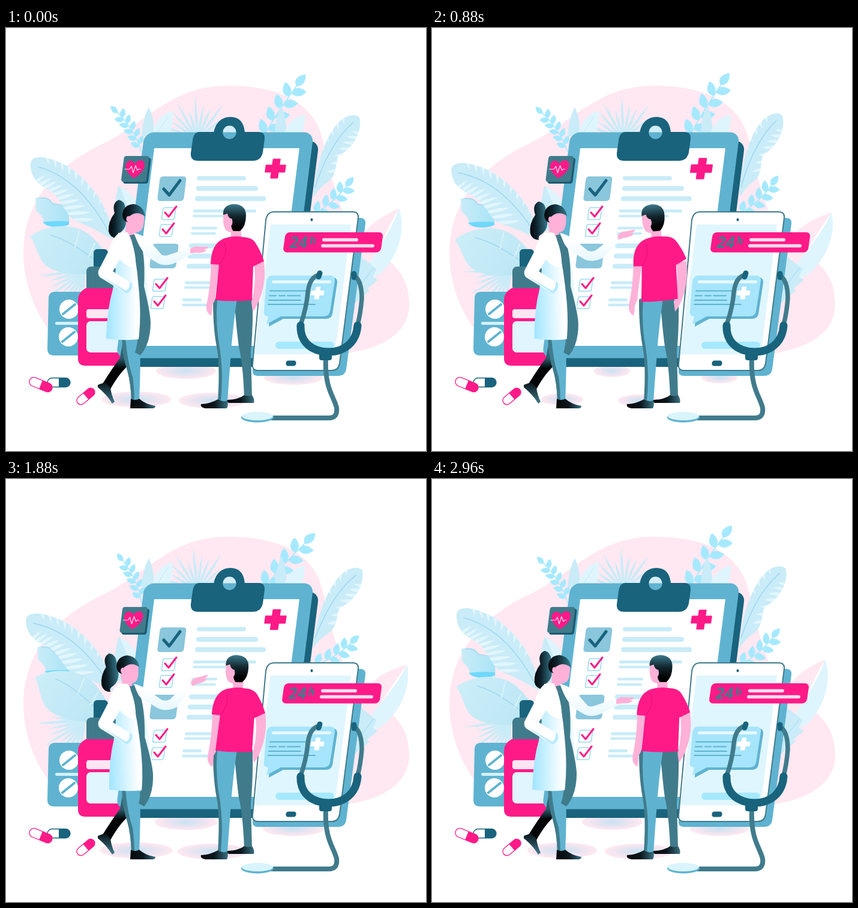
These frames come from a looping animation (700x704 px, 3 s). An HTML page:

```html
<!DOCTYPE html>
<html lang="en">
<head>
<meta charset="utf-8">
<title>Medical consultation</title>
<style>
html, body { margin: 0; width: 100%; height: 100%; overflow: hidden; background: #fff; }
svg { display: block; width: 700px; height: 704px; }
</style>
</head>
<body>
<svg id="stage" viewBox="0 0 700 704"></svg>
<script>
const BLUE = '#5fb3d0', DARK = '#19637d', TEAL = '#407b8c', PINK = '#ff1a88', SKIN = '#ffb1d8';
const PALE = '#c9ecf8', ICE = '#dff5fd', SKY = '#a6e9ff', BLUSH = '#ffe8f1', MINT = '#9fd9ef';

// Drawing helpers, all returning SVG markup
const path = (d, fill, more = '') => `<path d="${d}" fill="${fill}" ${more}/>`;
const line = (d, color, w) => path(d, 'none', `stroke="${color}" stroke-width="${w}" stroke-linecap="round" stroke-linejoin="round"`);
const oval = (x, y, rx, ry, fill) => `<ellipse cx="${x}" cy="${y}" rx="${rx}" ry="${ry}" fill="${fill}"/>`;
const rect = (x, y, w, h, r, fill, more = '') => `<rect x="${x}" y="${y}" width="${w}" height="${h}" rx="${r}" fill="${fill}" ${more}/>`;
const slant = (x, y, w, h, r, fill, k = 7.2, more = '') =>
  `<g transform="translate(${x} ${y}) skewX(${-k})">${rect(0, 0, w, h, r, fill, more)}</g>`;
const bar = (x1, x2, y, h, fill) => rect(x1, y - h / 2, x2 - x1, h, h / 2, fill);
const group = (id, body, more = '') => `<g id="${id}" ${more}>${body}</g>`;
const grad = (id, x2, y2, ...stops) => `<linearGradient id="${id}" x2="${x2}" y2="${y2}">` +
  stops.map(([o, c]) => `<stop offset="${o}" stop-color="${c}"/>`).join('') + '</linearGradient>';
const plus = (x, y, w, h, arm, fill) => `<g transform="translate(${x} ${y}) skewX(-8)">` +
  rect(-arm / 2, -h / 2, arm, h, 1, fill) + rect(-w / 2, -arm / 2, w, arm, 1, fill) + '</g>';

// Point and direction on a quadratic curve given as [x0, y0, cx, cy, x1, y1]
function along(q, t) {
  const u = 1 - t, f = (a, b, c) => u * u * a + 2 * u * t * b + t * t * c;
  const g = (a, b, c) => 2 * u * (b - a) + 2 * t * (c - b);
  return [f(q[0], q[2], q[4]), f(q[1], q[3], q[5]), Math.atan2(g(q[1], q[3], q[5]), g(q[0], q[2], q[4]))];
}

const at = (x, y, a) => `transform="translate(${x} ${y}) rotate(${a * 180 / Math.PI})"`;
const blade = (x, y, a, len, w, fill) => path(`M0 0Q${len * .45} ${-w} ${len} 0Q${len * .45} ${w} 0 0Z`, fill, at(x, y, a));

// Broad leaf with a short stalk and a pointed end
const leaflet = (x, y, a, len) => path(`M0 0C${len * .2} ${-len * .42} ${len * .62} ${-len * .38} ${len} 0` +
  `C${len * .7} ${len * .3} ${len * .3} ${len * .38} 0 0Z`, SKY, at(x, y, a));

function sprig(q, pairs, len) {
  let s = line(`M${q[0]} ${q[1]}Q${q.slice(2).join(' ')}`, SKY, 1.6);
  for (let i = 0; i < pairs; i++) {
    for (const side of [-1, 1]) {
      const [x, y, a] = along(q, .12 + .68 * (i + (side > 0 ? .3 : 0)) / (pairs - 1));
      s += leaflet(x, y, a + side * .85, len);
    }
  }
  return s + leaflet(q[4], q[5], along(q, 1)[2], len);
}

function banana(id, d, q, n, size) {
  let s = '';
  for (let i = 0; i < n; i++) {
    for (const side of [-1, 1]) {
      const t = .08 + .8 * i / n, [x, y, a] = along(q, t);
      s += blade(x + Math.cos(a + side * 1.1) * 10, y + Math.sin(a + side * 1.1) * 10, a + side * 2.15, size, 6, '#e3f6fd');
    }
  }
  return group(id, path(d, PALE) + `<clipPath id="${id}Clip">${path(d, '#000')}</clipPath>` +
    `<g clip-path="url(#${id}Clip)">${s}</g>` + line(`M${q[0]} ${q[1]}Q${q.slice(2).join(' ')}`, MINT, 1.6));
}

function fan(x, y, from, to, n, len) {
  let s = '';
  for (let i = 0; i < n; i++) {
    const a = (from + (to - from) * i / (n - 1)) * Math.PI / 180;
    s += blade(x, y, a, len * (.85 + .15 * Math.cos(i * 2.4)), 4.5, PALE);
  }
  return s;
}

function pill(x, y, a, w, h, c) {
  return `<g transform="translate(${x} ${y}) rotate(${a})">` +
    rect(-w / 2, -h / 2, w, h, h / 2, '#fff', `stroke="${c}" stroke-width="1.3"`) +
    path(`M0 ${-h / 2}H${w / 2 - h / 2}a${h / 2} ${h / 2} 0 0 1 0 ${h}H0Z`, c) + '</g>';
}

const smallCheck = (x, y) => slant(x, y, 21, 20, 3, '#fff', 8, 'stroke="#9cdcf3" stroke-width="1.6"') +
  line(`M${x + 3} ${y + 8}l6 7L${x + 22} ${y - 2}`, PINK, 3);
const tablet = (x, y) => oval(x, y, 16, 16, '#fff') + line(`M${x - 10} ${y + 8}L${x + 10} ${y - 8}`, BLUE, 4);
const shadow = (id, x, y, rx, ry) => group(id, oval(0, 0, rx, ry, 'url(#shade)'), `data-at="${x} ${y}"`);

const defs = '<defs>' +
  '<radialGradient id="shade"><stop offset="0" stop-color="#c8e2f3"/><stop offset=".6" stop-color="#ebe4f0"/><stop offset="1" stop-color="#ffe9f1"/></radialGradient>' +
  grad('coat', 1, 0, [0, '#a0e5ff'], [.9, '#fff']) +
  grad('flap', 1, 0, [0, '#d5f2fd'], [1, '#fff']) +
  grad('cloth', 0, 1, [.3, '#fff'], [1, '#e6f7fe']) +
  grad('hairW', 1, 0, [0, '#05090c'], [.35, '#0d1f28'], [1, '#34788b']) +
  grad('hairM', 0, 1, [0, '#3a7a8b'], [.45, '#13252d'], [.85, '#000']) +
  grad('shoe', 1, 0, [0, '#05080a'], [.5, '#0b161c'], [1, '#3a7080']) +
  grad('heel', 0, 1, [0, '#0a1419'], [1, TEAL]) +
  grad('backLeg', 0, 1, [0, TEAL], [.4, '#2b5d6c'], [.6, '#020405']) +
  grad('ovalFill', 1, .4, [0, '#cdeff9'], [1, '#bce6f4']) +
  grad('bowl', 1, 0, [0, '#c9ecf8'], [1, '#a9e4f6']) + '</defs>';

const backdrop = path('M370 96C440 96 500 115 522 168C538 210 545 300 590 352C610 378 672 385 672 460C672 515 610 541 540 544C300 560 120 560 70 500C40 460 29 410 29 375C29 290 80 235 150 198C232 163 270 96 370 96Z', BLUSH);

const plants =
  group('palmTop', fan(319, 186, -158, -28, 11, 74)) +
  group('sprigL', sprig([226, 206, 214, 168, 186, 141], 5, 16)) +
  group('sprigR', sprig([426, 186, 452, 140, 484, 97], 4, 25)) +
  path('M226 180Q228 150 238 132Q248 152 246 180Z', PALE) + path('M242 180Q252 144 277 138Q281 160 270 180Z', ICE) +
  line('M250 178L270 147', PALE, 1.2) +
  path('M448 180Q448 150 459 129Q468 150 468 180Z', PALE) + path('M462 180Q472 148 498 144Q499 162 491 180Z', ICE) +
  banana('bananaR', 'M512 282C514 235 532 175 560 152C574 142 591 143 590 154C592 177 576 202 555 212C547 225 555 247 531 260Q520 270 512 282Z', [579, 157, 540, 190, 515, 265], 7, 34) +
  group('sprigLow', sprig([508, 312, 546, 292, 567, 264], 4, 20)) +
  group('wing', path('M582 420C578 350 600 325 655 300Q625 350 606 408Z', BLUSH) +
    path('M588 422C610 380 640 345 655 300C667 335 655 378 625 408Q608 418 588 422Z', ICE)) +
  path('M588 378L618 401L611 414L620 419L602 434L606 437L572 466Z', PALE) + line('M578 445L612 400', MINT, 1) +
  group('bowlLeaf', path('M49 283C60 280 72 282 77 292Q90 296 103 297Q106 312 105 327Q96 331 84 331Q68 331 63 326Q64 315 50 304Z', 'url(#bowl)') +
    path('M61 323Q82 320 105 322V327Q96 331 84 331Q68 331 61 323Z', '#6fd8fb') + line('M56 283Q72 281 77 292L100 296', MINT, 1.5)) +
  path('M178 335Q180 295 187 263Q212 272 224 305L215 340Z', PALE) + path('M190 265Q212 272 224 305L213 320Z', ICE) +
  banana('bananaL', 'M178 352C178 300 130 238 85 222C65 213 42 211 41 226C40 246 52 260 70 269C95 282 96 312 118 322C145 332 165 345 178 352Z', [53, 231, 125, 250, 174, 345], 10, 46) +
  group('palmLow', fan(133, 403, 98, 182, 10, 82) + line('M75 412Q110 398 133 403', PALE, 2)) +
  group('ovalLeaf', path('M40 347C70 325 115 324 140 345C158 360 172 382 180 402C150 412 85 417 62 391C51 375 50 360 40 347Z', 'url(#ovalFill)') +
    line('M75 345Q112 355 168 402', MINT, 1.5) + line('M115 365L122 338M138 380L148 358', '#daf3fb', 2));

const shadows = shadow('sh1', 300, 571, 50, 13) + shadow('sh2', 479, 582, 49, 12) +
  shadow('sh3', 217, 618, 58, 13) + shadow('sh4', 344, 620, 56, 13);

const medicine =
  path('M82 439H150V545H80Q69 545 69 534L71 450Q71 439 82 439Z', BLUE) + tablet(105, 468) + tablet(104, 514) + bar(82, 124, 491.5, 5, '#d3f1fb') +
  rect(146, 368, 24, 40, 6, DARK) + rect(134, 397, 50, 42, 8, TEAL) +
  path('M133 433H200V562H132Q120 562 120 550V452Q120 440 133 433Z', PINK) +
  rect(134, 468, 60, 15, 4, '#ffe6f2') + rect(134, 488, 60, 52, 7, '#e0f5fd') +
  pill(88, 590, 0, 38, 15, DARK) + pill(58, 593.5, 22, 40, 15, PINK) + pill(133, 613, -40, 35, 14, PINK);

const texts = [[318, 400, 250, 7], [317, 420, 267, 8], [315, 433, 284, 8], [312, 417, 304.5, 5], [311, 395, 313, 4],
  [309, 352, 333, 4.5], [308, 350, 342, 4], [305, 357, 362.5, 8], [303, 353, 379.5, 8], [301, 353, 396.5, 8],
  [298, 345, 424, 5], [297, 345, 432, 4], [294, 326, 452.5, 5], [293, 340, 461, 4.5]];

const clipboard = slant(241, 188, 281, 376, 16, DARK) + slant(231, 173.5, 282, 376, 16, BLUE) + slant(247, 200, 242, 329, 1, '#fff') +
  path('M346 182C345 163 356 148 374 148C392 148 399 162 398 182Z', DARK) +
  path('M322 173H421Q432 173 431 185L428 207Q425 221 411 221H320Q307 221 308 208L311 187Q313 173 322 173Z', DARK) +
  oval(372.5, 173.5, 11, 11, '#d3edf8') + path('M361.5 173.5H383.5A11 11 0 0 1 361.5 173.5Z', BLUE) +
  texts.map(([a, b, y, h]) => bar(a, b, y, h, '#c8ecf8')).join('') +
  slant(257, 247, 44, 41, 5, '#8ac6dc') + line('M263 268L272 278L290 254', DARK, 5) +
  slant(244, 359, 44, 41, 5, '#8ac6dc') +
  smallCheck(262, 299) + smallCheck(258, 327) + smallCheck(247, 418) + smallCheck(244, 447) +
  group('cross', plus(0, 0, 34, 33, 13, PINK)) +
  group('heart', slant(200, 216, 42, 43, 4, '#1c5a70') + slant(197, 213, 42, 43, 4, TEAL) +
    path('M213 250C203 243 197 234 200 226C203 219 212 219 215 226C219 218 229 218 231 226C232 236 223 244 213 250Z', PINK) +
    line('M198 235H206L209 230L212 241L216 229L219 237L221 235H224', '#ffe3f1', 1.2));

const phone =
  path('M460 316H590Q600 316 599 326L567 568Q565 579 553 579H420Q410 579 411 570Z', BLUE) +
  path('M447 306H578Q588 306 587 316L556 558Q554 570 543 570H420Q410 570 411 560L433 320Q435 306 447 306Z', '#fff', `stroke="${TEAL}" stroke-width="2"`) +
  path('M441 327H575L548 543H414Z', '#e0f6fe') + oval(509.5, 319, 2, 2.5, DARK) +
  slant(467, 553.5, 17, 9, 4, DARK, 6) + rect(449, 522, 98, 12, 6, SKY) +
  path('M445 415H545Q553 416 552 424L544 476Q542 484 533 484H462L438 497L439 478Z', BLUE) +
  path('M443 412H541Q549 413 548 421L540 472Q538 480 529 480H458L434 493L437 480Q428 479 430 470L434 422Q436 412 443 412Z', '#a6e5fb') +
  bar(443, 542, 422.5, 5, '#e6f8ff') + line('M440 437.5H504M439 445.5H450M455 445.5H465M469 445.5H490M438 453H491M437 460H515', BLUE, 2) +
  plus(519, 441, 22, 21, 8, '#fff') +
  group('badge', slant(466, 340, 163, 33.5, 7, PINK, 8) +
    `<text x="473" y="366" fill="${TEAL}" font-family="'Open Sans', 'Noto Sans', sans-serif" font-weight="700" font-style="italic" font-size="27">24<tspan font-size="18" dx="3" dy="-6">h</tspan></text>` +
    bar(527, 587, 352.5, 5.5, '#ffdcec') + bar(525, 614, 362.5, 5.5, '#ffdcec'));

const woman =
  path('M196 515L226 520Q222 545 208 558Q190 572 174 601L161 592Q176 568 190 549Z', 'url(#backLeg)') +
  path('M153 594Q160 591 166 590L174 599Q176 612 181 622L177 625Q168 610 153 598Z', 'url(#heel)') +
  path('M193 510H223Q225 560 222 621H209Q208 590 202 570Q194 545 193 510Z', BLUE) +
  path('M193 512L199 514Q202 555 211 580Q214 600 214 621H209Q208 590 202 570Q194 545 193 512Z', TEAL) +
  path('M208 617Q215 621 222 617Q232 626 249 629Q249 633 244 633H207Z', 'url(#shoe)') +
  group('coatG',
    path('M222 345Q234 390 236 430Q241 475 245 508Q239 514 222 516Z', 'url(#flap)') +
    path('M207 344L221 347Q233 372 230 430Q240 470 241 490Q241 525 224 545L215 540Q228 500 212 400Z', TEAL) +
    path('M190 342L206 341Q217 380 221 430Q226 480 221 518Q195 521 167 517Q168 470 178 435Q186 395 185 348Z', 'url(#coat)')) +
  group('tail', path('M199 300Q198 288 188 286Q176 291 181 308Q170 322 171 338Q173 349 185 350Q182 344 191 340Q203 331 200 312Z', 'url(#hairW)')) +
  group('neck', path('M200 328H215L216 346L209 358L199 345Z', SKIN)) +
  path('M187 341L203 340Q218 372 216 400Q190 395 184 372Z', '#fff') + path('M206 345L216 343L222 352L215 368Z', TEAL) +
  path('M190 341Q178 346 171 371L154 404Q152 413 160 417L201 442Q212 437 210 425L178 405L196 375Z', '#fff') +
  path('M156 411L201 442Q212 437 210 425L206 422Q207 434 200 437Z', '#b9ebfe') +
  path('', 'url(#cloth)', 'id="sleeve"') +
  group('hand', path('M-2 -4Q5 -10 14 -8L28 -8Q29 -5 20 -3L26 -2Q20 3 8 2L-2 3Z', SKIN)) +
  group('head', path('M201 318Q210 302 230 311Q231 328 226 336Q219 343 205 340Q197 330 201 318Z', SKIN) +
    path('M194 310Q196 294 213 293Q230 296 232 314Q219 303 206 313Q206 321 202 323Q194 321 194 310Z', 'url(#hairW)') +
    oval(204, 318, 3.5, 5, SKIN));

const man =
  path('M380 450H411Q412 500 408 540L410 614H397Q395 560 388 530Q384 500 380 450Z', TEAL) +
  path('M346 450H385Q378 500 375 540L369 621H354Q357 560 352 530Q345 500 346 450Z', BLUE) +
  path('M345 452H352Q349 490 355 525Q363 570 358 621H353Q357 560 351 530Q345 500 345 452Z', TEAL) +
  path('M397 611Q404 614 410 611Q415 618 413 624H372Q367 623 369 619Q388 618 397 611Z', 'url(#shoe)') +
  path('M353 618Q361 623 369 620Q371 628 368 633H332Q323 631 325 626Q341 625 353 618Z', 'url(#shoe)') +
  group('arms', path('M342 390L357 392Q351 420 349 445Q349 455 344 460Q344 470 342 479Q333 474 334 462Q341 430 342 390Z', SKIN) +
    path('M413 390L430 388Q434 420 424 448Q418 465 411 472L409 456Q418 425 413 390Z', SKIN)) +
  group('torso', path('M375 333H392V350Q383 354 375 349Z', SKIN) +
    path('M364 350Q380 345 395 348Q410 348 416 358Q425 372 430 388L412 397L410 453Q378 456 349 453L355 394L341 393Q342 358 364 350Z', PINK) +
    line('M363 356Q372 373 356 393', '#e80f7b', 1) +
    path('M363 308Q360 325 366 336Q374 343 380 338L383 316Z', SKIN) +
    path('M362 311Q361 294 380 293Q400 294 400 312Q400 330 390 338H379Q373 332 377 318Q370 316 369 309Z', 'url(#hairM)') +
    oval(374.5, 323, 3, 6, SKIN));

const stethoscope =
  line('M521 411Q506 415 503 440Q501 465 491 494', TEAL, 7.5) + line('M580 412Q593 420 593 450Q591 475 586 494', TEAL, 7.5) +
  line('M521 414L523 408M580 415L580 409', DARK, 9) +
  line('M533 550C531 600 546 612 551 632Q553 649 538 649H430', TEAL, 8) +
  line('M491 495C490 525 512 539 538 539C563 539 584 524 586 495', DARK, 13) + rect(522, 534, 21, 19, 4, DARK) +
  oval(419, 648, 27, 8.5, BLUE) + oval(419, 646, 26, 7, '#d9f4fd');

const stage = document.getElementById('stage');
stage.innerHTML = defs + backdrop + plants + shadows + medicine + clipboard + phone + woman + man + stethoscope;

// Poses at the key times; smooth periodic interpolation between them
const LOOP = 3000, TIMES = [0, 330, 880, 1250, 1880, 2380];
const POSES = {
  sprig: [0, -2.2, -1.5, 3, 7.7, 5.7],
  bananaL: [0, -1.7, -4.4, -5.4, -4, -1.9],
  bananaR: [0, -1.2, -2.6, -1.7, 2.4, 1.8],
  wing: [0, 1.8, 5.7, 7, 7.2, 5],
  oval: [0, -1.5, -2.3, .6, 7, 8],
  man: [0, -2.2, -5, -3.4, 1.7, 3.6],
  head: [0, -2, -7, -10, -10, -6],
  tail: [0, -4, -10, -15, -16, -11],
  wristX: [308, 312, 311, 309, 310, 311],
  wristY: [372, 361, 349, 342, 341, 350],
  elbowY: [386, 382, 379, 376, 376, 379],
  badge: [0, 1, 2, 1, -2, -2],
  heart: [0, -1, -2.5, -2.5, -2.5, -1.5],
  cross: [1, 1.06, 1.07, 1, 1.05, 1.08],
  shadow: [1, .85, .61, .82, 1.04, 1.03]
};

function pose(name, t) {
  const v = POSES[name], n = v.length;
  const T = i => TIMES[(i + n) % n] + LOOP * Math.floor(i / n), V = i => v[(i + n) % n];
  const slope = i => (V(i + 1) - V(i - 1)) / (T(i + 1) - T(i - 1));
  let i = n - 1;
  while (TIMES[i] > t) i--;
  const d = T(i + 1) - T(i), u = (t - T(i)) / d, w = 1 - u;
  return w * w * (1 + 2 * u) * V(i) + u * u * (3 - 2 * u) * V(i + 1) + d * u * w * (w * slope(i) - u * slope(i + 1));
}

const parts = Object.fromEntries([...stage.querySelectorAll('g[id]')].map(g => [g.id, g]));
const sleeve = document.getElementById('sleeve');
const move = (id, value) => parts[id].setAttribute('transform', value);
const turn = (id, angle, x, y) => move(id, `rotate(${angle} ${x} ${y})`);

function draw(now) {
  const t = now % LOOP, p = name => pose(name, t);
  const sprigA = p('sprig'), ovalA = p('oval'), sway = p('man'), head = p('head'), tail = p('tail');
  turn('sprigL', sprigA, 226, 206);
  turn('sprigR', sprigA * 1.2, 426, 186);
  turn('sprigLow', sprigA * 1.2, 508, 312);
  turn('palmTop', sprigA * -.35, 319, 186);
  turn('bananaL', p('bananaL'), 180, 345);
  turn('bananaR', p('bananaR'), 515, 265);
  turn('wing', p('wing'), 590, 412);
  turn('ovalLeaf', ovalA, 180, 402);
  turn('palmLow', p('bananaL') * -1.2, 133, 403);
  move('bowlLeaf', `translate(${ovalA * .5} ${-ovalA * .45})`);

  const scale = p('shadow');
  for (const id of ['sh1', 'sh2', 'sh3', 'sh4'])
    move(id, `translate(${parts[id].dataset.at}) scale(${scale} ${.4 + scale * .6})`);

  move('cross', `translate(449 234) scale(${p('cross')})`);
  move('heart', `translate(${p('heart')} 0)`);
  move('badge', `translate(${p('badge')} 0)`);

  move('coatG', `translate(0 400) skewX(${-head * .25}) translate(0 -400)`);
  move('head', `translate(${head * .75} ${-head * .05}) rotate(${head * .4} 210 345)`);
  move('neck', `translate(${head * .6} 0)`);
  move('tail', `translate(${tail * .8} ${-tail * .25}) rotate(${tail * .3} 190 325)`);

  const x = p('wristX'), y = p('wristY'), e = p('elbowY');
  sleeve.setAttribute('d', `M213 341Q225 343 238 353L260 ${e - 8}Q267 ${e - 6} 273 ${e - 9}L${x - 3} ${y - 6}L${x + 3} ${y + 4}` +
    `L284 ${e + 4}Q267 ${e + 12} 254 ${e + 6}L234 ${e - 6}Q224 367 219 356Z`);
  move('hand', `translate(${x + 1} ${y}) rotate(${(y - 372) * .5})`);

  turn('torso', sway, 380, 455);
  move('arms', `translate(${sway * 1.2} 0)`);
}

function loop() {
  draw(performance.now());
  requestAnimationFrame(loop);
}
loop();
</script>
</body>
</html>
```
